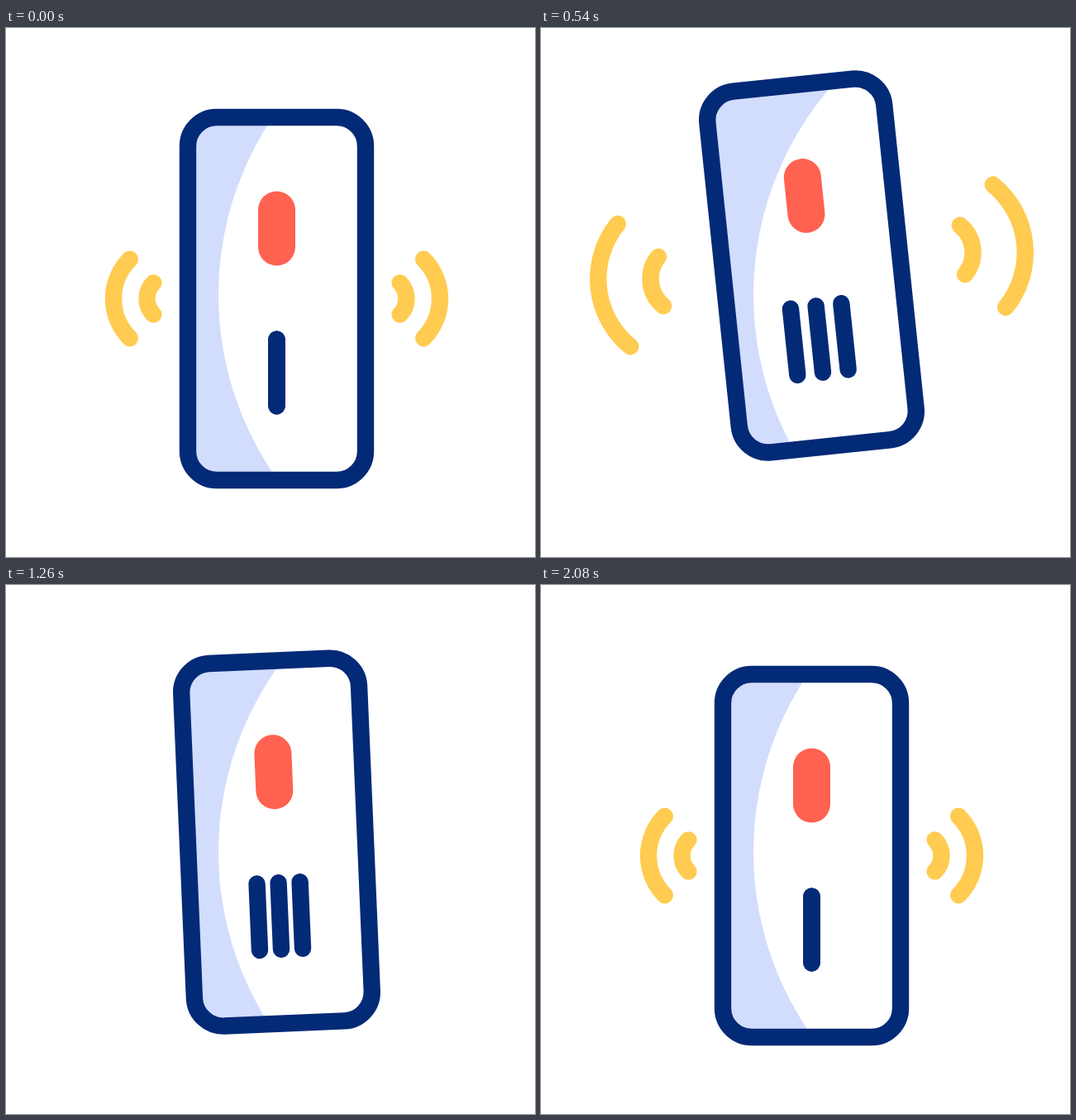
These frames come from a looping animation (640 px wide and 640 px high, 2400 ms). An HTML page with a canvas:

```html
<!DOCTYPE html>
<html lang="en">
<head>
<meta charset="utf-8">
<title>Ringing phone</title>
<style>
html, body { margin: 0; width: 100%; height: 100%; overflow: hidden; background: #fff; }
canvas { display: block; width: 640px; height: 640px; }
</style>
</head>
<body>
<canvas id="stage" width="640" height="640"></canvas>
<script>
const ctx = document.getElementById('stage').getContext('2d');
const LOOP = 2400, CX = 327.5, CY = 327.5;
const NAVY = '#032a76', LILAC = '#d2dcfd', RED = '#ff6250', YELLOW = '#ffcb50';

// Vertical swing of the phone: [ms, px]
const SWING = [
  [0, 0], [120, 0], [240, -1], [360, -9], [500, -33], [580, -46], [640, -51.8],
  [750, -53.7], [900, -50.5], [1060, -40], [1180, -27.5], [1320, -8], [1460, 10],
  [1640, 16.4], [1760, 14], [1860, 8.8], [1980, 2.2], [2080, 0], [LOOP, 0]
];

function slope(keys, i) {
  const a = keys[i - 1], b = keys[i], c = keys[i + 1];
  if (!a || !c || (b[1] - a[1]) * (c[1] - b[1]) <= 0) return 0;
  return (c[1] - a[1]) / (c[0] - a[0]);
}

// Hermite curve through the keys, flat at the turning points
function track(keys, t) {
  const i = keys.findIndex(k => k[0] > t) - 1;
  const [t0, v0] = keys[i], [t1, v1] = keys[i + 1];
  const d = t1 - t0, x = (t - t0) / d, y = 1 - x;
  return y * y * (1 + 2 * x) * v0 + x * x * (1 + 2 * y) * v1
    + d * x * y * (y * slope(keys, i) - x * slope(keys, i + 1));
}

function ease(t, from, to) {
  const x = Math.min(1, Math.max(0, (t - from) / (to - from)));
  return (1 - Math.cos(Math.PI * x)) / 2;
}

function pill(x, y, w, h, color) {
  ctx.fillStyle = color;
  ctx.beginPath();
  ctx.roundRect(x - w / 2, y - h / 2, w, h, w / 2);
  ctx.fill();
}

function body() {
  ctx.beginPath();
  ctx.roundRect(-107.5, -219.5, 215, 439, 35);
}

function waves(t) {
  if (t >= 700 && t < 1660) return;
  const scale = t < 700 ? 1 + 0.665 * ease(t, 80, 700) : 0.69 + 0.31 * ease(t, 1650, 2080);
  const center = 158 - 28 * scale + 70 * Math.max(0, scale - 1);
  ctx.strokeStyle = YELLOW;
  for (const side of [0, Math.PI]) {
    for (const r of [27, 67.5]) {
      ctx.beginPath();
      ctx.arc(center * Math.cos(side), 0, r * scale, side - Math.PI / 4, side + Math.PI / 4);
      ctx.stroke();
    }
  }
}

function draw(t) {
  const dy = track(SWING, t);
  const angle = dy / (dy < 0 ? 6.7 : 5.3) * Math.PI / 180;
  const place = () => {
    ctx.translate(CX, CY + dy);
    ctx.rotate(angle);
  };

  ctx.fillStyle = '#fff';
  ctx.fillRect(0, 0, 640, 640);
  ctx.lineWidth = 20.4;
  ctx.lineCap = 'round';

  ctx.save();
  place();
  waves(t);
  pill(0, -85, 45, 90, RED);
  ctx.restore();

  // The shade keeps its place on the stage and shows only inside the phone
  ctx.save();
  place();
  body();
  ctx.clip();
  ctx.setTransform(1, 0, 0, 1, 0, 0);
  ctx.fillStyle = LILAC;
  ctx.beginPath();
  ctx.rect(0, 0, 640, 640);
  ctx.arc(642, 323, 385, 0, 2 * Math.PI);
  ctx.fill('evenodd');
  ctx.restore();

  ctx.save();
  place();
  const gap = 38.5 * (ease(t, 160, 700) - ease(t, 1055, 1590));
  for (const k of [-1, 0, 1]) pill(k * gap, 89.5, 20.4, 101, NAVY);
  ctx.strokeStyle = NAVY;
  body();
  ctx.stroke();
  ctx.restore();
}

const start = performance.now();
function tick() {
  draw((performance.now() - start) % LOOP);
  requestAnimationFrame(tick);
}
tick();
</script>
</body>
</html>
```
